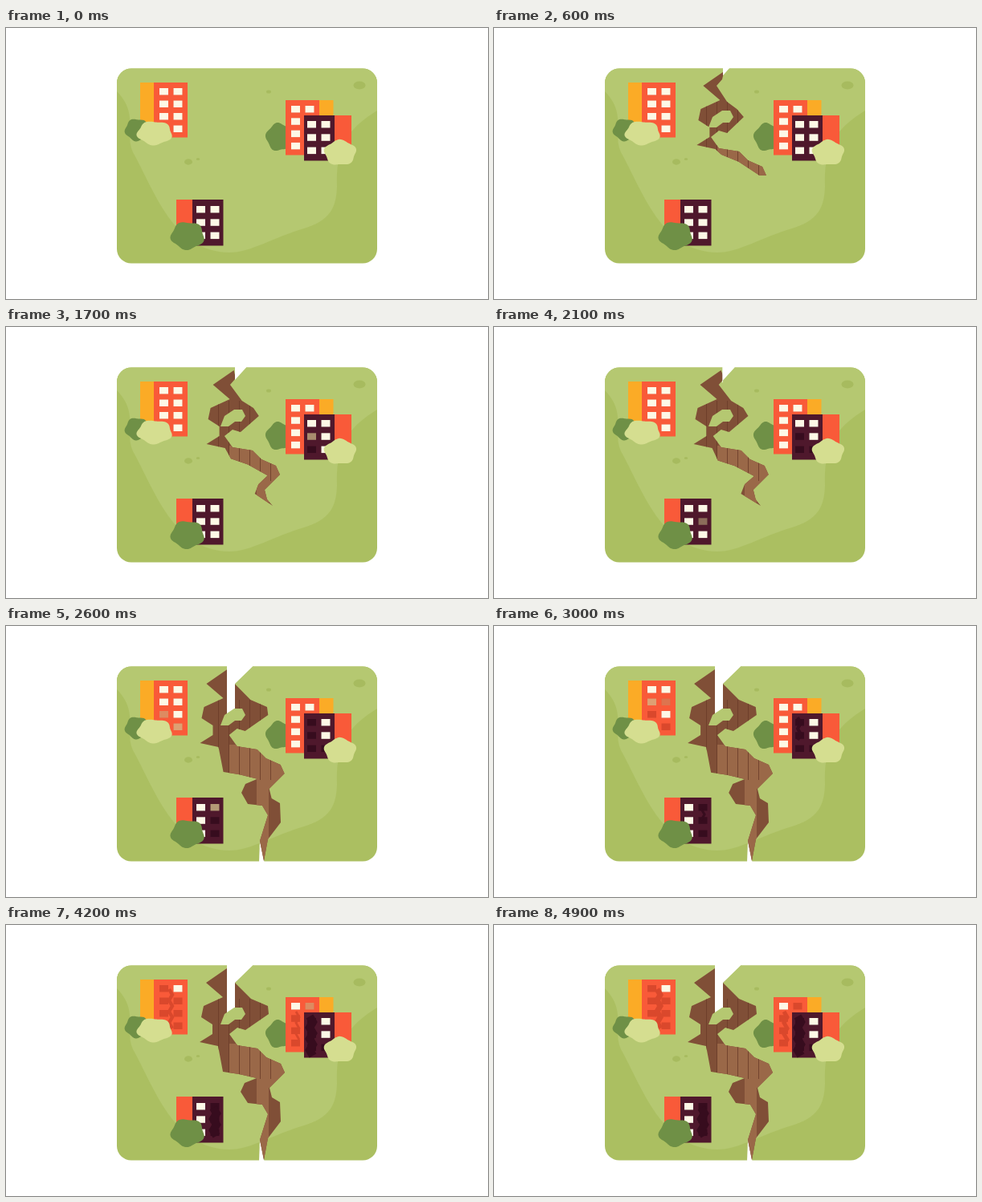
Animation, 600 px wide and 338 px high, one loop 5000 ms. Source, as an HTML page with a canvas:

```html
<!DOCTYPE html>
<html>
<head>
<meta charset="utf-8">
<style>
  html, body { margin: 0; overflow: hidden; background: #fff; }
  canvas { display: block; }
</style>
</head>
<body>
<canvas id="stage" width="600" height="338"></canvas>
<script>
const ctx = document.getElementById('stage').getContext('2d');
const LOOP = 5000, STEP = 100, STAYS = Infinity;
const ORANGE = '#f95a39', YELLOW = '#fbab26', PLUM = '#4f182c';
const LIT = '#fdf8e6', DIM = '#e2cd96';
const ORANGE_OFF = '#da482c', PLUM_OFF = '#370c1e';
const BUSH = '#6f9046', PALE_BUSH = '#d5de90', GRASS = '#b5c871', GRASS_DARK = '#abbf61';
const BROWN = '#9a6848', BROWN_DARK = '#804f37', BROWN_LINE = '#693b29';

// Edges of the open fissure, top to bottom.
const LEFT = [[275,54], [249,72], [270,90], [246,101], [243,115], [257,124], [257,136], [241,146],
  [264,151], [270,183], [290,186], [312,191], [297,197], [292,208], [301,222], [319,224],
  [326,236], [316,268], [321,293]];
const RIGHT = [[292,64], [285,72], [305,92], [326,101], [327,111], [298,131], [288,128], [278,136],
  [288,150], [313,154], [324,165], [342,173], [347,184], [328,203], [331,215],
  [341,221], [342,245], [326,266]];
const TIP = [332, 223], TAIL_Y = 220;

const mix = (a, b, k) => a + (b - a) * k;
const ramp = (t, from, to) => Math.min(1, Math.max(0, (t - from) / (to - from)));
const smooth = k => k * k * (3 - 2 * k);
const bump = (y, center, width) => Math.exp(-(((y - center) / width) ** 2));

// How far each edge moves inwards when the fissure is narrow.
const closeLeft = y => [10 + 12 * bump(y, 203, 14), -23 * bump(y, 181, 9)];
const closeRight = y => [-7 - 14 * bump(y, 102, 11), 0];

function edge(points, closing, open, tail) {
  return points.map(([x, y]) => {
    if (y > TAIL_Y) return [mix(TIP[0], x, tail), mix(TIP[1], y, tail)];
    const [dx, dy] = closing(y);
    return [x + dx * (1 - open), y + dy * (1 - open)];
  });
}

function rect(color, x, y, w, h) {
  ctx.fillStyle = color;
  ctx.fillRect(x, y, w, h);
}

function poly(color, points) {
  ctx.beginPath();
  for (const [x, y] of points) ctx.lineTo(x, y);
  ctx.closePath();
  ctx.fillStyle = color;
  ctx.fill();
}

function spot(x, y, rx, ry) {
  ctx.fillStyle = '#a7bb5f';
  ctx.beginPath();
  ctx.ellipse(x, y, rx, ry, 0, 0, 7);
  ctx.fill();
}

// Ellipse with five soft lobes, one of them at the given angle.
function bush(color, cx, cy, rx, ry, lobe) {
  const points = [];
  for (let deg = 0; deg < 360; deg += 4) {
    const a = deg * Math.PI / 180, r = 0.97 + 0.07 * Math.cos(5 * (a - lobe));
    points.push([cx + rx * r * Math.cos(a), cy + ry * r * Math.sin(a)]);
  }
  poly(color, points);
}

// Two columns of windows, each dimming from its own start time.
function windows(t, x, y, pitch, off, times) {
  times.forEach((start, i) => {
    const wx = x + i % 2 * 17.5, wy = y + (i >> 1) * pitch;
    const fade = ramp(t, start, start + 300);
    rect(off, wx, wy, 11, 8.5);
    ctx.globalAlpha = 1 - fade;
    rect(fade ? DIM : LIT, wx, wy, 11, 8.5);
    ctx.globalAlpha = 1;
  });
}

function wallCrack(t, x, y, bottom, color, start, width) {
  const k = ramp(t, start, start + 900);
  if (!k) return;
  const end = mix(y, bottom, Math.min(1, k * 2));
  ctx.beginPath();
  for (let i = 0; y + i * 7 <= end; i++) ctx.lineTo(x + (i % 2 ? 2 : -2), y + i * 7);
  ctx.strokeStyle = color;
  ctx.lineWidth = mix(1, width, k);
  ctx.stroke();
}

function land() {
  ctx.beginPath();
  ctx.roundRect(138, 50.5, 324, 243, 18);
  ctx.fillStyle = GRASS_DARK;
  ctx.fill();
  ctx.save();
  ctx.clip();
  ctx.fillStyle = GRASS;
  ctx.beginPath();
  ctx.moveTo(138, 40);
  ctx.lineTo(138, 79);
  ctx.bezierCurveTo(166, 108, 147, 130, 158, 155);
  ctx.bezierCurveTo(185, 203, 208, 279, 278, 280);
  ctx.bezierCurveTo(305, 280, 330, 262, 374, 249);
  ctx.bezierCurveTo(408, 238, 411, 218, 412, 198);
  ctx.bezierCurveTo(410, 145, 428, 124, 462, 103);
  ctx.lineTo(462, 40);
  ctx.fill();
  ctx.restore();
  spot(440, 71.5, 7.5, 5);
  spot(327, 79.5, 3, 2);
  spot(227, 167, 5, 3.7);
  spot(239, 163.5, 2.2, 1.6);
}

function fissure(t) {
  const grow = ramp(t, 0, 1100);
  if (!grow) return;
  const open = 0.3 * (grow - 1) + 0.25 * ramp(t, 1200, 2100)
    + 0.7 * smooth(ramp(t, 2100, 2600)) + 0.05 * ramp(t, 2600, 3100);
  const tail = ramp(open, 0.3, 0.95), split = ramp(open, 0.2, 0.95);

  ctx.save();
  ctx.beginPath();
  ctx.rect(130, 40, 340, mix(10, 255, grow));
  ctx.clip();
  if (tail > 0.9) poly('#fff', [[316, 268], [315, 295], [321.5, 295], [321, 291]]);

  const left = edge(LEFT, closeLeft, open, tail), right = edge(RIGHT, closeRight, open, tail);
  poly(BROWN_DARK, [...left, ...right.reverse()]);
  ctx.save();
  ctx.clip();
  rect(BROWN, 278, 148, 80, 43);
  rect(BROWN, 312, 191, 40, 12);
  rect(BROWN, 312, 203, 15, 90);
  for (let x = 264; x < 335; x += 13) rect(BROWN_LINE, x, 92, 0.8, 100);
  ctx.restore();

  const notchLeft = mix(285, 275, split), notchRight = mix(285, mix(299, 307, split), grow);
  const corner = mix(51, mix(66, 72, split), grow), floor = mix(corner, 110, split);
  poly('#fff', [[notchLeft, 48], [notchRight, 48], [notchRight, 50.5],
    [285, corner], [285, floor], [notchLeft, floor]]);
  poly(GRASS, [[272,111], [284,103], [294,103], [298,111], [293,118], [285,118], [277,124], [267,124]]);
  ctx.restore();
}

function northWest(t) {
  rect(YELLOW, 167, 68, 17, 60);
  rect(ORANGE, 184, 68, 42, 68.5);
  windows(t, 191, 75, 15.5, ORANGE_OFF,
    [3700, STAYS, 2900, 2800, 2450, 3600, 2300, 2500]);
  wallCrack(t, 205, 80, 130, ORANGE_OFF, 3700, 7);
  bush(BUSH, 163, 127, 15, 14, -0.84);
  bush(PALE_BUSH, 185, 131, 22, 15, -0.84);
}

function east(t) {
  bush(BUSH, 340, 136, 16.5, 17.5, -1.75);
  rect(YELLOW, 390, 90, 17.5, 30);
  rect(ORANGE, 348, 90, 42, 68.5);
  windows(t, 355, 97, 15.3, ORANGE_OFF,
    [STAYS, 4050, 3700, STAYS, 3600, STAYS, 3250]);
  wallCrack(t, 363, 108, 154, ORANGE_OFF, 3800, 5);
  rect(ORANGE, 409, 109, 21, 45);
  rect(PLUM, 371, 109, 38, 56.5);
  windows(t, 375, 116, 16.3, PLUM_OFF, [2200, STAYS, 1600, STAYS, 1400, 1700]);
  wallCrack(t, 380, 114, 163, PLUM_OFF, 2700, 10);
  bush(PALE_BUSH, 416, 155.5, 20, 16, -1.6);
}

function south(t) {
  rect(ORANGE, 212, 214, 20, 40);
  rect(PLUM, 232, 214, 38.5, 57.5);
  windows(t, 237, 222, 16.3, PLUM_OFF, [STAYS, 2520, STAYS, 1950, STAYS, 2200]);
  wallCrack(t, 260, 228, 269, PLUM_OFF, 2800, 10);
  bush(BUSH, 226, 259, 21, 17.5, -0.84);
}

function draw(now) {
  const t = Math.floor(now % LOOP / STEP) * STEP;
  rect('#fff', 0, 0, 600, 338);
  land();
  fissure(t);
  northWest(t);
  east(t);
  south(t);
  requestAnimationFrame(draw);
}
requestAnimationFrame(draw);
</script>
</body>
</html>
```
